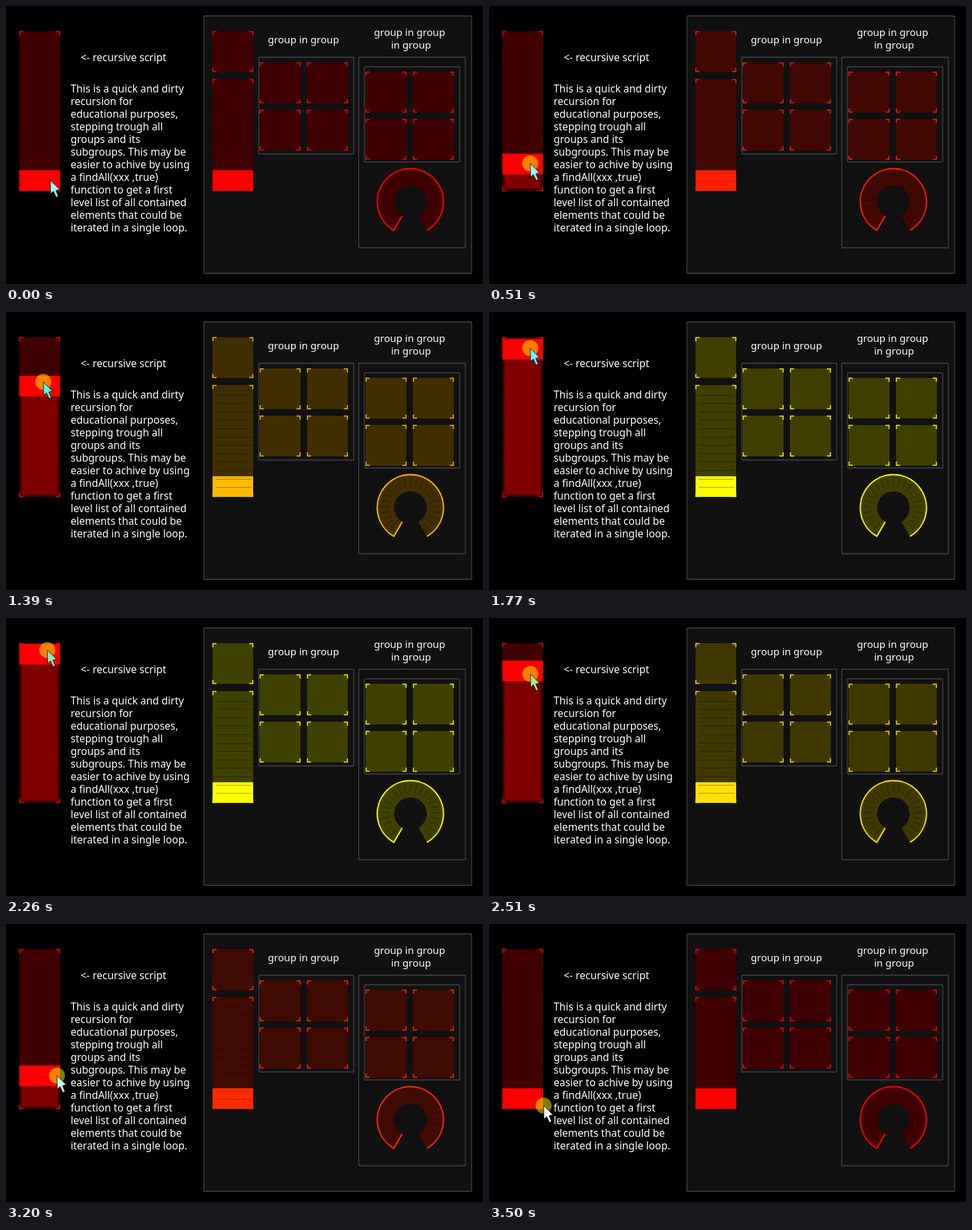
Recreate the animation shown at these times as an HTML page. Size 716 px wide and 418 px high, loop 3570 ms.

```html
<!DOCTYPE html>
<html lang="en">
<head>
<meta charset="utf-8">
<title>Recursive colour fader</title>
<style>
  html, body { margin: 0; width: 100%; height: 100%; overflow: hidden; background: #000; }
  svg { display: block; width: 716px; height: 418px; }
  text { font: 15.5px "Noto Sans", "Open Sans", sans-serif; fill: #fff; white-space: pre; }
  .title { font-size: 15.1px; text-anchor: middle; }
  .panel { fill: #111; stroke: #444; stroke-width: 1.3; }
  .red { --main: rgb(255, 0, 0); --dark: rgb(64, 0, 0); --groove: .13; }
  .body { fill: var(--dark); }
  .solid { fill: var(--main); }
  .edge { fill: none; stroke: var(--main); stroke-width: 1.5; }
  .arc { stroke-width: 2; }
  .tick { fill: none; stroke: #000; stroke-opacity: var(--groove); }
</style>
</head>
<body>
<svg id="stage" viewBox="0 0 716 418">
  <g id="left" class="red"></g>
  <g id="right"></g>
  <g id="words"></g>
  <circle id="press" r="12" fill="#ff0" fill-opacity=".5"/>
  <path id="cursor" d="M0 0L.5 20.5L4.6 16.5L8.8 25.5L12 24L8.4 15.4L13.8 13.8Z" stroke="#000" stroke-width=".8"/>
</svg>
<script>
const LOOP = 3570, REST = 247, TOP = 39, HANDLE = 31;
const $ = id => document.getElementById(id);

function add(parent, tag, attrs, content) {
  const el = document.createElementNS("http://www.w3.org/2000/svg", tag);
  for (const k in attrs) el.setAttribute(k, attrs[k]);
  if (content) el.textContent = content;
  return parent.appendChild(el);
}

const rect = (g, cls, x, y, width, height, rx = 1) =>
  add(g, "rect", { class: cls, x, y, width, height, rx });

function brackets(g, x, y, w, h) {
  const s = 5.5, r = x + w, b = y + h;
  add(g, "path", { class: "edge", d:
    `M${x} ${y + s}V${y}H${x + s}M${r - s} ${y}H${r}V${y + s}` +
    `M${r} ${b - s}V${b}H${r - s}M${x + s} ${b}H${x}V${b - s}` });
}

function pad(g, x, y, w = 60, h = 60) {
  rect(g, "body", x - .5, y - .5, w + 1, h + 1);
  brackets(g, x, y, w, h);
}

function grooves(g, x1, x2, y, gap, count) {
  let d = "";
  for (let i = 0; i < count; i++) d += `M${x1} ${Math.floor(y + i * gap) + .5}H${x2}`;
  add(g, "path", { class: "tick", d });
}

function pads(g, x, y) {
  for (const dy of [0, 71]) for (const dx of [0, 71]) pad(g, x + dx, y + dy);
}

function knob(g, cx, cy, R, r) {
  const at = (rad, deg) => {
    const a = deg * Math.PI / 180;
    return `${(cx - rad * Math.sin(a)).toFixed(2)} ${(cy + rad * Math.cos(a)).toFixed(2)}`;
  };
  const sweep = `A${R} ${R} 0 1 1 ${at(R, 330)}`;
  add(g, "path", { class: "body",
    d: `M${at(R, 30)}${sweep}L${at(r, 330)}A${r} ${r} 0 1 0 ${at(r, 30)}Z` });
  let d = "";
  for (let a = 42.5; a < 325; a += 12.5) d += `M${at(31, a)}L${at(45, a)}`;
  add(g, "path", { class: "tick", d });
  add(g, "path", { class: "edge arc", d: `M${at(r, 30)}L${at(R, 30)}${sweep}` });
}

// Left fader
const left = $("left"), right = $("right"), words = $("words");
pad(left, 20.5, 38.5, 60, 239);
const fill = rect(left, "", 23.5, 0, 54, 0, 0);
fill.setAttribute("fill", "#800000");
const handle = rect(left, "solid", 20, 0, 61, HANDLE);
grooves(left, 27, 76, 44.6, 14.25, 16);

// Right group with nested groups
rect(right, "panel", 297, 15, 402, 387);
rect(right, "panel", 379.5, 77, 142.5, 145.5);
rect(right, "panel", 529.5, 77, 160, 286.5);
rect(right, "panel", 538, 91.5, 143, 143);
pad(right, 310.5, 38.5);
pad(right, 310.5, 110.5, 60, 167);
rect(right, "solid", 310, REST, 61, HANDLE);
grooves(right, 315, 368, 125, 12.6, 12);
pads(right, 381.5, 85.5);
pads(right, 540.5, 99.5);
knob(right, 607, 294.3, 49.7, 24.5);

// Labels
add(words, "text", { x: 112, y: 83 }, "<- recursive script");
["This is a quick and dirty", "recursion for", "educational purposes,",
 "stepping trough all", "groups and its", "subgroups. This may be",
 "easier to achive by using", "a findAll(xxx ,true)", "function to get a first",
 "level list of all contained", "elements that could be", "iterated in a single loop."
].forEach((line, i) => add(words, "text", { x: 97, y: 130 + 19 * i }, line));
add(words, "text", { class: "title", x: 446.5, y: 56 }, "group in group");
add(words, "text", { class: "title", x: 605.7, y: 45 }, "group in group");
add(words, "text", { class: "title", x: 608, y: 64 }, "in group");

// time, pointer x, pointer y, handle top, pointer r, g, b
const keys = [
  [0, 66.5, 262, REST, 150, 255, 255],
  [320, 66.5, 262, REST, 150, 255, 255],
  [910, 51.5, 179.5, 165.5, 120, 255, 245],
  [1390, 56, 105, 96, 64, 255, 224],
  [1450, 57.5, 96, 86, 70, 250, 230],
  [1770, 62, 53, TOP, 100, 245, 250],
  [1950, 62, 45, TOP, 120, 240, 220],
  [2260, 62, 48, TOP, 140, 235, 180],
  [2510, 62, 84, 64, 160, 232, 144],
  [2870, 68, 154, 133, 140, 255, 215],
  [3320, 80, 258, 245, 220, 255, 245],
  [3390, 81, 267, REST, 255, 255, 255],
  [3500, 82, 273, REST, 255, 255, 255],
  [LOOP, 82, 273, REST, 255, 255, 255]
];

// The picture advances in bursts of evenly spaced steps: start, end, count
const bursts = [
  [380, 820, 8], [910, 1390, 9], [1450, 1950, 9],
  [2260, 2760, 9], [2810, 3320, 9], [3390, 3500, 3]
];
const steps = [0];
for (const [a, b, n] of bursts)
  for (let i = 0; i < n; i++) steps.push(Math.floor((a + (b - a) * i / (n - 1)) / 10) * 10);

function pose(t) {
  const i = keys.findIndex(k => k[0] > t);
  const a = keys[i - 1], b = keys[i], p = (t - a[0]) / (b[0] - a[0]);
  return a.map((v, j) => v + (b[j] - v) * p);
}

function draw(now) {
  const t = steps.filter(s => s <= now).pop();
  const [, x, y, top, r, g, b] = pose(t);
  const value = (REST - top) / (REST - TOP), green = 255 * value;
  right.style.setProperty("--main", `rgb(255, ${Math.round(green)}, 0)`);
  right.style.setProperty("--dark", `rgb(64, ${Math.round(green / 4)}, 0)`);
  // grooves show less on pure red
  right.style.setProperty("--groove", Math.min(.36, .1 + value * .7));
  handle.setAttribute("y", top);
  fill.setAttribute("y", top + HANDLE);
  fill.setAttribute("height", Math.max(0, 274.5 - top - HANDLE));
  const move = `translate(${x} ${y})`;
  $("press").setAttribute("transform", move);
  $("press").setAttribute("visibility", t ? "visible" : "hidden");
  $("cursor").setAttribute("transform", move);
  $("cursor").setAttribute("fill", `rgb(${[r, g, b].map(Math.round)})`);
}

const start = performance.now();
function tick() {
  draw((performance.now() - start) % LOOP);
  requestAnimationFrame(tick);
}
tick();
</script>
</body>
</html>
```
